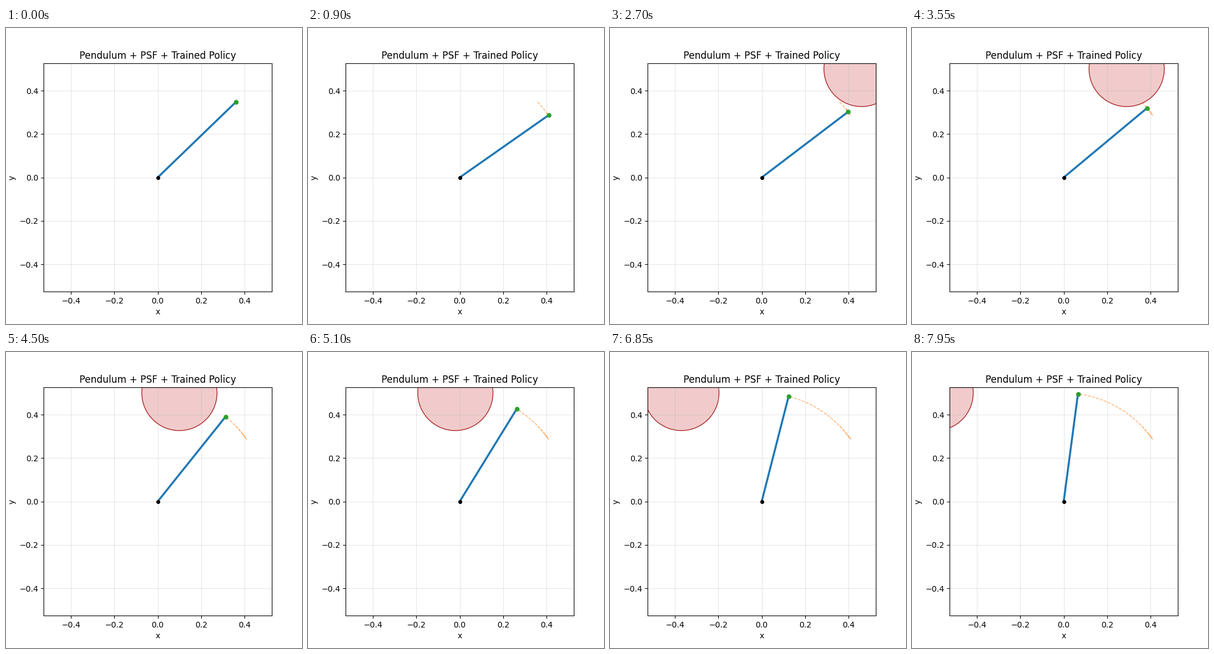
A matplotlib script that plays this animation: 520x520 px, repeating every 8 s.

```python
import numpy as np
import matplotlib.pyplot as plt
from matplotlib.animation import FuncAnimation
from matplotlib.patches import Circle

FRAMES, STEP_MS = 160, 50
LENGTH = 0.5
LIMIT = 1.05 * LENGTH
RADIUS = 0.1733


def swing(t):
    """Damped sway around the waiting angle."""
    return 0.907 - 0.104 * np.exp(-0.7 * t) * np.cos(np.pi * t)


def glide(t):
    """Slowing return towards upright once the obstacle has passed."""
    u = t - 3.755
    return 0.8327 - 0.2132 * u + 0.00262 * u ** 3


def smoothstep(t, start, end):
    s = np.clip((t - start) / (end - start), 0, 1)
    return s * s * (3 - 2 * s)


times = np.arange(FRAMES) * STEP_MS / 1000
mix = smoothstep(times, 2.6, 3.5)
theta = (1 - mix) * swing(times) + mix * glide(times)
tip_x, tip_y = LENGTH * np.sin(theta), LENGTH * np.cos(theta)

fig, ax = plt.subplots(figsize=(5.2, 5.2), dpi=100)
ax.set_aspect("equal")
ax.set(xlim=(-LIMIT, LIMIT), ylim=(-LIMIT, LIMIT), xlabel="x", ylabel="y",
       title="Pendulum + PSF + Trained Policy")
ticks = np.arange(-2, 3) / 5
ax.set_xticks(ticks)
ax.set_yticks(ticks)
ax.grid(True, alpha=0.3)

obstacle = Circle((1.0, 0.5), RADIUS, facecolor=(0.776, 0.157, 0.157, 0.24),
                  edgecolor="#aa2626", linewidth=1)
ax.add_patch(obstacle)
trail, = ax.plot([], [], "--", color="tab:orange", lw=1, alpha=0.6)
rod, = ax.plot([], [], color="tab:blue", lw=2.5)
bob, = ax.plot([], [], "o", color="tab:green", ms=5)
ax.plot([0], [0], "o", color="black", ms=4)


def update(i):
    x, y = tip_x[i], tip_y[i]
    obstacle.center = (1.0 - 0.2 * times[i], 0.5)
    trail.set_data(tip_x[:i + 1], tip_y[:i + 1])
    rod.set_data([0, x], [0, y])
    bob.set_data([x], [y])
    return obstacle, trail, rod, bob


anim = FuncAnimation(fig, update, frames=FRAMES, interval=STEP_MS,
                     repeat=True, repeat_delay=0, blit=False)
plt.show()
```
